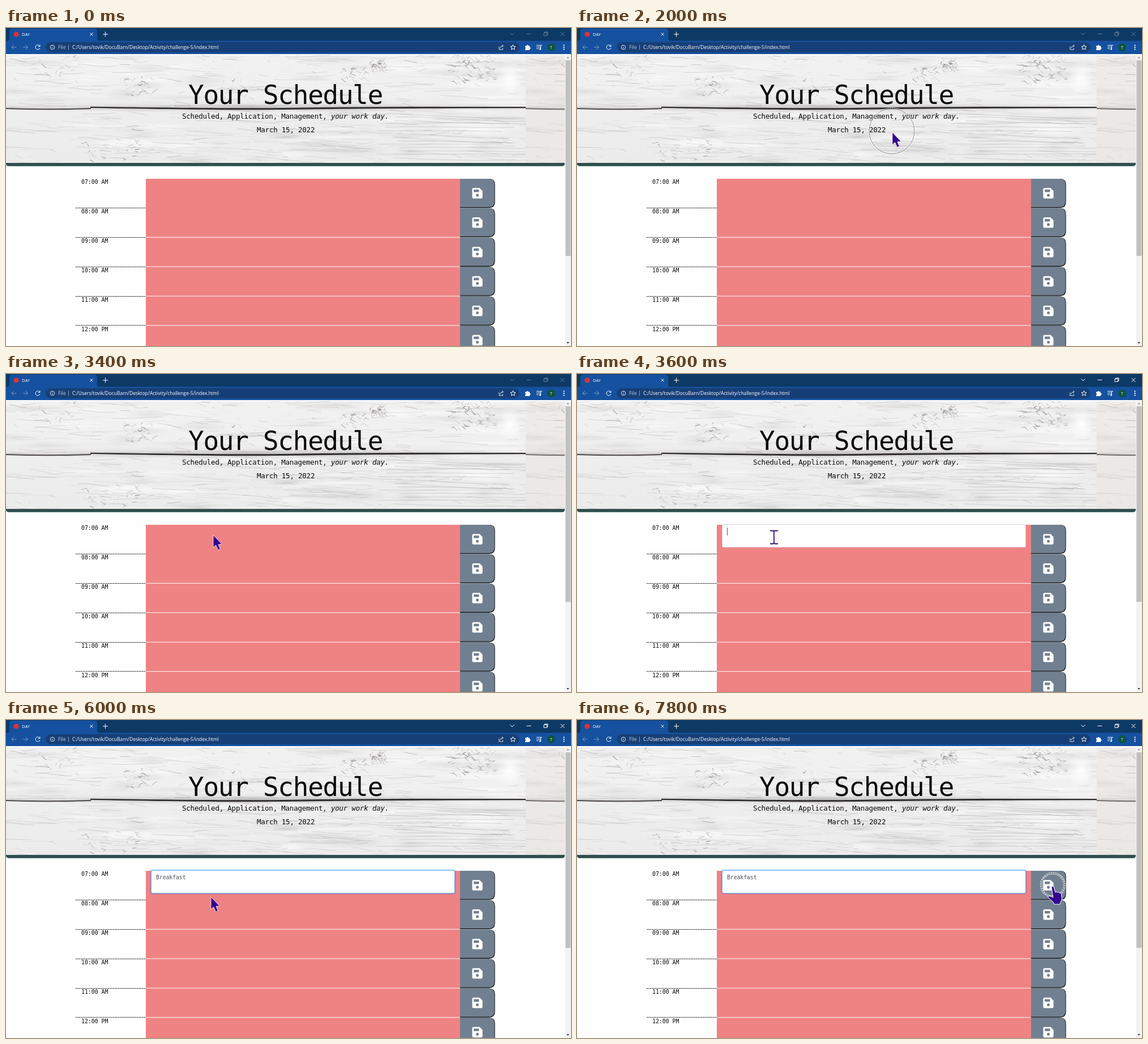
An HTML page with a canvas for the animation above (8 s loop, 998 by 561 pixels).

```html
<!DOCTYPE html>
<html lang="en">
<head>
<meta charset="utf-8">
<title>Your Schedule</title>
<style>
html, body { margin: 0; width: 100%; height: 100%; overflow: hidden; background: #fefefe; }
#stage { position: relative; width: 998px; height: 561px; overflow: hidden; }
canvas, svg, #field { position: absolute; left: 0; top: 0; }
canvas { top: 47px; }
text { white-space: pre; }
.mono { font-family: "DejaVu Sans Mono", monospace; fill: #0a0a0a; }
.ui { font: 8.5px "Open Sans", "Noto Sans", sans-serif; fill: #fff; }
.line { fill: none; stroke: #fff; stroke-width: 1; }

/* every state holds until the next one */
#win, #field, #typed, #cursor, .shape, #ring { animation: 8s step-end infinite; }

#win { animation-name: activate; }
@keyframes activate { 0% { opacity: .36; } 45%, 100% { opacity: 1; } }

#field {
  left: 256px; top: 265px; width: 537px; height: 41px; box-sizing: border-box;
  background: #fefefe; border: 1px solid #ced4da; border-radius: 3px;
  animation-name: edit;
}
@keyframes edit {
  0% { visibility: hidden; }
  45% { visibility: visible; border-color: #d5d9de; box-shadow: none; }
  47.5%, 100% { visibility: visible; border-color: #78aef2; box-shadow: 0 0 0 1.6px rgba(0, 123, 255, .28); }
}
#typed {
  position: absolute; left: 8px; top: 5px; height: 14px; width: 0; overflow: hidden;
  font: 9.7px/14px "DejaVu Sans Mono", monospace; color: #495057; white-space: pre;
  border-right: 1px solid transparent;
  animation-name: type;
}
@keyframes type {
  0% { width: 0; border-color: transparent; }
  45% { width: 0; border-color: #555; }
  50% { width: 0; border-color: transparent; }
  55% { width: 1ch; border-color: #555; }
  57.5% { width: 3ch; border-color: #555; }
  60% { width: 5ch; border-color: #555; }
  62.5% { width: 7ch; border-color: #555; }
  65% { width: 9ch; border-color: #555; }
  67.5%, 100% { width: 9ch; border-color: transparent; }
}

#cursor { animation-name: travel; }
@keyframes travel {
  0% { transform: translate(-60px, -60px); }
  2.5% { transform: translate(546px, 430px); }
  5% { transform: translate(545px, 380px); }
  7.5% { transform: translate(546px, 325px); }
  10% { transform: translate(552px, 262px); }
  12.5% { transform: translate(564px, 182px); }
  15% { transform: translate(559.5px, 183px); }
  17.5% { transform: translate(557px, 184px); }
  37.5% { transform: translate(545px, 196px); }
  40% { transform: translate(470px, 246px); }
  42.5% { transform: translate(366px, 284px); }
  45% { transform: translate(348px, 288px); }
  75% { transform: translate(362px, 312px); }
  77.5% { transform: translate(430px, 378px); }
  80% { transform: translate(582px, 402px); }
  82.5% { transform: translate(760px, 358px); }
  85%, 100% { transform: translate(838px, 293px); }
}
#arrow { animation-name: arrow; }
#beam { animation-name: beam; }
#hand { animation-name: hand; }
@keyframes arrow { 0% { opacity: 1; } 45% { opacity: 0; } 75% { opacity: 1; } 85%, 100% { opacity: 0; } }
@keyframes beam { 0% { opacity: 0; } 45% { opacity: 1; } 75%, 100% { opacity: 0; } }
@keyframes hand { 0% { opacity: 0; } 85%, 100% { opacity: 1; } }

#ring { animation-name: click; }
#ring circle { fill: none; vector-effect: non-scaling-stroke; }
@keyframes click {
  0% { opacity: 0; transform: none; }
  22.5% { opacity: .4; transform: translate(556px, 182px) scale(53); }
  25% { opacity: .6; transform: translate(556px, 182px) scale(40); }
  27.5% { opacity: .8; transform: translate(556px, 182px) scale(29); }
  30% { opacity: 1; transform: translate(556px, 182px) scale(20.5); }
  32.5% { opacity: 1; transform: translate(556px, 182px) scale(14); }
  35% { opacity: 1; transform: translate(556px, 182px) scale(9.3); }
  37.5% { opacity: 0; transform: none; }
  90% { opacity: .4; transform: translate(840.5px, 291px) scale(53); }
  92.5% { opacity: .6; transform: translate(840.5px, 291px) scale(40); }
  95% { opacity: .8; transform: translate(840.5px, 291px) scale(29); }
  97.5%, 100% { opacity: 1; transform: translate(840.5px, 291px) scale(20.5); }
}
</style>
</head>
<body>
<div id="stage">
<canvas id="wood" width="987" height="191"></canvas>

<svg width="998" height="561" viewBox="0 0 998 561">
  <defs>
    <g id="disk">
      <path d="M2.5 0H13L18.2 5.2V16Q18.2 18.5 16 18.5H2.5Q0 18.5 0 16V2.5Q0 0 2.5 0Z" fill="#fff"/>
      <path d="M2.7 2.8H12V7.3H2.7Z" fill="#708090"/>
      <circle cx="9.1" cy="12.8" r="2.5" fill="#708090"/>
    </g>
  </defs>

  <!-- browser frame -->
  <path d="M0 0H998V23H0Z" fill="#0d3965"/>
  <path d="M0 22.5H998V46H0Z" fill="#15519f"/>
  <path d="M2 23Q6 23 6 18V6Q6 1 11 1H156Q161 1 161 6V18Q161 23 165 23Z" fill="#15519f"/>
  <rect x="70" y="25" width="837" height="18" rx="9" fill="#173f77"/>
  <path d="M0 46H998V48H0Z" fill="#fdfdfd"/>
  <circle cx="18" cy="11" r="4.6" fill="#d8343c"/>
  <text class="ui" x="28" y="14" style="font-size:7.6px">DAY</text>
  <path class="line" d="M148.5 8.5l5 5m0-5l-5 5M171 11h9m-4.5-4.5v9"/>
  <g id="win" class="line">
    <path d="M890.5 8.5l3.5 3.5 3.5-3.5M919.5 10.5h8M950 8.5h5.5v5h-5.5zM951.5 8.5v-1.5h5.5v5h-1.5M979.5 7l7 7m0-7l-7 7"/>
  </g>
  <g class="line" opacity=".42">
    <path d="M18.5 34h-8.5m4-4l-4 4 4 4M30 34h8.5m-4-4l4 4-4 4"/>
  </g>
  <path class="line" d="M59.3 31.5a4 4 0 1 0 .7 3.5M60 29.5v3h-3"/>
  <g class="line" opacity=".85">
    <circle cx="82" cy="34" r="3.8"/>
    <path d="M82 33.5v2.6m0-4.6v1"/>
    <path d="M110.5 29.5v9" opacity=".6"/>
    <path d="M871 32.5v5.5h6.5v-2.5M873 35.5q.5-4 5-4m-1.700-2l2 2-2 2"/>
  </g>
  <text class="ui" x="92" y="37" opacity=".75">File</text>
  <text class="ui" x="117" y="37">C:/Users/tovik/DocuBarn/Desktop/Activity/challenge-5/index.html</text>
  <path class="line" d="M895.5 29.5l1.3 3 3.2.3-2.4 2.1.7 3.2-2.8-1.7-2.8 1.7.7-3.2-2.4-2.1 3.2-.3z"/>
  <path fill="#fff" d="M917 31.5h2.5a1.600 1.600 0 0 1 3.200 0H925v2.300a1.600 1.600 0 0 1 0 3.200v2h-8v-2.200a1.600 1.600 0 0 0 0-3z"/>
  <path class="line" d="M937 30.5h7M937 33.5h7M937 36.500h4M944.500 37v-6.500h2.500"/>
  <circle cx="943.5" cy="37" r="1.5" fill="#fff"/>
  <circle cx="963" cy="34" r="7" fill="#0c5440"/>
  <text class="ui" x="961" y="36.5" style="font-size:7px">T</text>
  <path d="M984.5 29.5h2v2h-2zM984.5 33h2v2h-2zM984.5 36.5h2v2h-2z" fill="#fff"/>

  <!-- scrollbar -->
  <path d="M987.5 48H998V561H987.5Z" fill="#f2f2f2"/>
  <path d="M988.3 57H997.3V402H988.3Z" fill="#c0c0c0"/>
  <path d="M990 53.5h5l-2.5-3z" fill="#999"/>
  <path d="M990 554h5l-2.5 3z" fill="#444"/>

  <!-- heading -->
  <path d="M0 238H987V239Q987 243.7 982 243.7H5Q0 243.7 0 239Z" fill="#2f4f4f"/>
  <g class="mono">
    <text x="322" y="134" font-size="46" letter-spacing="-1.3">Your Schedule</text>
    <text x="311" y="160" font-size="12.6" letter-spacing="-.28">Scheduled, Application, Management, <tspan font-style="italic">your work day.</tspan></text>
    <text x="443" y="184" font-size="12.6" letter-spacing="-.28">March 15, 2022</text>
  </g>
  <g id="rows"></g>
</svg>

<div id="field"><div id="typed">Breakfast</div></div>

<svg width="998" height="561" viewBox="0 0 998 561">
  <g id="ring">
    <circle r="1" stroke="#fff" stroke-width="3.4" stroke-dasharray="3 1"/>
    <circle r="1" stroke="#4a4a4a" stroke-width="1"/>
  </g>
  <g id="cursor" fill="#33058f" stroke="#fff" stroke-linejoin="round">
    <path id="arrow" class="shape" d="M0 0V22L4.800 18 8.500 26.500 12.500 24.800 9 16.800 15.500 16.300Z" stroke-width=".8"/>
    <path id="beam" class="shape" fill="none" stroke="#33156f" stroke-width="1.8"
      d="M-7-11.5H-2Q0-11.5 0-9.5Q0-11.5 2-11.5H7M0-9.5V9.5M-7 11.5H-2Q0 11.5 0 9.5Q0 11.5 2 11.5H7"/>
    <path id="hand" class="shape" stroke-width="1" d="M0 2Q1-1 4 1L7 11Q9 9 10.5 11Q13 9.500 14 12Q17 11 17.500 14L18.500 22Q18.500 26 16 28L15.500 32H4.500L3.500 28.500L-5.500 20.500Q-6.500 17-3 17.500L3 20Z"/>
  </g>
</svg>
</div>

<script>
// schedule rows
const hours = ["07:00 AM", "08:00 AM", "09:00 AM", "10:00 AM", "11:00 AM", "12:00 PM"];
const PITCH = 51.87;
document.getElementById("rows").innerHTML = hours.map((label, i) => `
  <g transform="translate(0 ${266 + PITCH * i})">
    <text class="mono" x="133" y="9.3" font-size="9.85">${label}</text>
    <path d="M123 51.5H247" stroke="#111" stroke-dasharray="2 1" shape-rendering="crispEdges"/>
    <path d="M247 0H802V${i ? 50.8 : 52}H247Z" fill="#ef8283"/>
    ${i ? "" : '<path d="M247 51.5H802" stroke="#e97c7e"/>'}
    <path d="M802 0H854Q863.7 0 863.7 10V41Q863.7 51.2 854 51.2H802Z" fill="#0b0d0f"/>
    <path d="M802 0H853Q862.8 0 862.8 10V40Q862.8 50 853 50H802Z" fill="#708090"/>
    <use href="#disk" x="823.5" y="16.2"/>
  </g>`).join("");

// pale painted boards
const canvas = document.getElementById("wood");
const ctx = canvas.getContext("2d");
const TILE = 918, H = 191, CRACK = 94;
let seed = 71;
const rand = (a = 0, b = 1) => {
  seed = (seed * 16807) % 2147483647;
  return a + (b - a) * seed / 2147483647;
};

function grain(x, y, len, alpha, width, tilt) {
  ctx.strokeStyle = `rgba(92,88,87,${alpha})`;
  ctx.lineWidth = width;
  ctx.beginPath();
  ctx.moveTo(x, y);
  ctx.bezierCurveTo(x + len * .3, y + rand(-3, 3), x + len * .7, y + tilt + rand(-3, 3), x + len, y + tilt);
  ctx.stroke();
}

function glow(x, y, rx, ry, color, alpha) {
  ctx.save();
  ctx.translate(x, y);
  ctx.scale(rx, ry);
  const g = ctx.createRadialGradient(0, 0, 0, 0, 0, 1);
  g.addColorStop(0, `rgba(${color},${alpha})`);
  g.addColorStop(1, `rgba(${color},0)`);
  ctx.fillStyle = g;
  ctx.fillRect(-1, -1, 2, 2);
  ctx.restore();
}

function chips(cx, cy, spread, n) {
  for (let i = 0; i < n; i++)
    grain(cx + rand(-spread, spread), cy + rand(-spread, spread) * .55, rand(2, 10), rand(.15, .55), rand(.5, 1.4), rand(-5, 6));
}

const base = ctx.createLinearGradient(0, 0, 0, H);
[[0, "#f2f1f1"], [.4, "#f1f0f0"], [.48, "#e8e7e7"], [.52, "#efeeee"], [1, "#edecec"]]
  .forEach(([at, color]) => base.addColorStop(at, color));
ctx.fillStyle = base;
ctx.fillRect(0, 0, TILE, H);

// soft patches, fine grain, then darker broken scratches
for (let i = 0; i < 70; i++)
  glow(rand(0, TILE), rand(0, H), rand(25, 90), rand(3, 12), i % 2 ? "255,255,255" : "180,178,178", i % 2 ? .5 : .24);
for (let i = 0; i < 420; i++)
  grain(rand(-40, TILE), rand(2, H), rand(12, 90), rand(.05, .22), rand(.4, 1.1), rand(-4, 7));
for (let i = 0; i < 90; i++)
  grain(rand(0, TILE), rand(2, H), rand(4, 32), rand(.2, .45), rand(.4, .9), rand(-3, 5));
for (let i = 0; i < 14; i++)
  grain(rand(640, 720), 104 + i * 6, rand(190, 270), .25, .8, rand(-2, 9));
[[655, 18, 15, 38], [610, 38, 24, 26], [820, 25, 42, 70], [235, 55, 28, 26],
 [180, 175, 50, 36], [400, 60, 30, 14], [90, 25, 40, 18]].forEach(c => chips(...c));
glow(890, 42, 24, 32, "255,255,255", .95);

// gap between the boards
glow(TILE / 2, CRACK, 520, 8, "90,88,88", .25);
ctx.strokeStyle = "#494543";
ctx.lineWidth = 1.8;
ctx.beginPath();
ctx.moveTo(0, 95);
ctx.quadraticCurveTo(70, 97.5, 150, 95);
ctx.stroke();
ctx.fillStyle = "#302d2c";
ctx.beginPath();
ctx.moveTo(149, 91.8);
ctx.bezierCurveTo(330, 94, 420, 95.5, 560, 93);
ctx.bezierCurveTo(680, 91.5, 800, 92, TILE, 92);
ctx.lineTo(TILE, 94.2);
ctx.bezierCurveTo(800, 94.5, 680, 94.5, 560, 96);
ctx.bezierCurveTo(420, 98.5, 330, 97, 149, 94);
ctx.fill();

// the picture repeats at the right edge
ctx.drawImage(canvas, 0, 0, 69, H, TILE, 0, 69, H);
ctx.fillStyle = "rgba(222,214,207,.25)";
ctx.fillRect(TILE, 0, 69, H);
</script>
</body>
</html>
```
